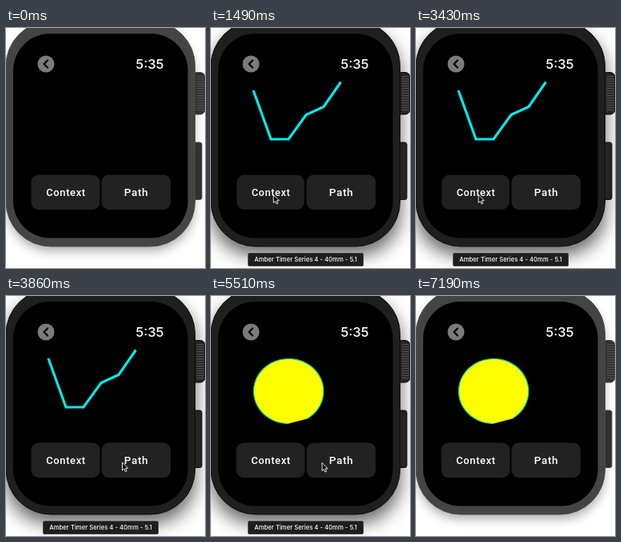
Write an HTML page that moves like this. It is 249 px wide and 300 px high and loops after 7470 ms.

```html
<!DOCTYPE html>
<html lang="en">
<head>
<meta charset="utf-8">
<title>Watch drawing demo</title>
<style>
  html, body { margin: 0; width: 100%; height: 100%; overflow: hidden; background: #fff; }
  svg { display: block; width: 249px; height: 300px; }
  text { fill: #fff; font-family: Roboto, sans-serif; font-weight: 500; }
  .mid { text-anchor: middle; }
  .ui { font-family: Inter, sans-serif; }
</style>
</head>
<body>
<svg viewBox="0 0 249 300">
  <defs>
    <filter id="soft" x="-30%" y="-30%" width="160%" height="160%"><feGaussianBlur stdDeviation="7"/></filter>
    <filter id="wide" x="-40%" y="-40%" width="180%" height="180%"><feGaussianBlur stdDeviation="11"/></filter>
    <pattern id="ridges" width="12" height="3" patternUnits="userSpaceOnUse">
      <rect width="12" height="1.2" fill="#525252"/>
    </pattern>
  </defs>
  <rect width="249" height="300" fill="#fff"/>
  <rect id="dimShade" x="2" y="2" width="233" height="276" rx="54" opacity=".36" filter="url(#soft)"/>
  <rect id="litShade" x="0" y="4" width="237" height="280" rx="54" opacity=".6" filter="url(#wide)"/>

  <g id="side" stroke-width="1">
    <rect x="231.5" y="55.5" width="17.500" height="52.500" rx="6"/>
    <rect x="233" y="143" width="12" height="71.500" rx="2.500"/>
  </g>
  <rect x="238.500" y="59" width="9.500" height="46" rx="4" fill="url(#ridges)"/>
  <rect id="body" x="0" y="-8.500" width="236.500" height="281.500" rx="56"/>
  <rect x="9" y="7" width="218.500" height="255.500" rx="46"/>

  <circle cx="50" cy="45" r="10.500" fill="#7b7b7b"/>
  <path d="M52 40.500L47.500 45L52 49.500" fill="none" stroke="#000" stroke-width="2.300" stroke-linecap="round" stroke-linejoin="round"/>
  <text class="ui" x="197.500" y="50.800" text-anchor="end" font-size="16.500">5:35</text>

  <path id="line" d="M53 78L75 139H97L119 108.500L141 98.500L162.500 67.500" fill="none" stroke="#00ecec" stroke-width="3.200"/>
  <path id="disc" d="M97 159.500A43.700 40.500 0 1 1 120 153.500" fill="#ff0" stroke="#00dcc0" stroke-width="1.200"/>

  <g id="context">
    <rect x="31.500" y="183.500" width="86" height="43.500" rx="9" fill="#222"/>
    <text class="mid" x="75" y="210" font-size="13" letter-spacing=".6">Context</text>
  </g>
  <g id="path">
    <rect x="119.500" y="183.500" width="86.500" height="43.500" rx="9" fill="#222"/>
    <text class="mid" x="163" y="210" font-size="13.500" letter-spacing=".7">Path</text>
  </g>

  <g id="label">
    <rect x="46.500" y="281.500" width="144" height="16" rx="1.500" fill="#1e1e1e" stroke="#484848"/>
    <text class="mid ui" x="118.500" y="292.300" font-size="7.700">Amber Timer Series 4 - 40mm - 5.1</text>
  </g>
  <path id="cursor" d="M0 0V10L2.300 7.900L3.900 11.500L5.500 10.800L4 7.300H7.100Z" fill="#000" stroke="#fff" stroke-width=".9" stroke-linejoin="round"/>
</svg>
<script>
const LOOP = 7470;
const el = id => document.getElementById(id);
const show = (id, on) => el(id).setAttribute('visibility', on ? 'visible' : 'hidden');
const within = (t, a, b) => t >= a && t < b;

// pointer stops: time, x, y
const stops = [
  [450, 67, 281], [600, 70, 238.5], [750, 75.5, 223], [900, 76.8, 211], [1040, 78.2, 208.5],
  [3720, 137, 208], [3860, 145.5, 208], [5360, 140, 209], [5510, 139, 208.5],
  [5650, 205, 243], [5800, 220.5, 264], [6100, 222.5, 267], [6250, 227.5, 278], [6400, 232.5, 291.5]
];

function press(id, cx, on) {
  el(id).setAttribute('transform', on
    ? `translate(${cx} 205.25) scale(.983) translate(${-cx} -205.25)` : '');
  el(id).firstElementChild.setAttribute('fill', on ? '#202020' : '#222');
}

function paint(id, fill, stroke) {
  el(id).setAttribute('fill', fill);
  el(id).setAttribute('stroke', stroke);
}

function draw(t) {
  const lit = within(t, 1490, 7190);
  show('litShade', lit);
  show('dimShade', !lit);
  paint('body', lit ? '#1f1f1f' : '#444', lit ? '#0c0c0c' : '#484848');
  paint('side', lit ? '#242424' : '#303030', lit ? '#0c0c0c' : '#484848');

  show('line', within(t, 1490, 4310));
  show('disc', t >= 4310);
  show('label', within(t, 600, 7190));
  press('context', 74.5, within(t, 1490, 1630) || within(t, 3430, 3570));
  press('path', 162.75, within(t, 4310, 4460));

  const stop = stops.filter(s => s[0] <= t).pop();
  show('cursor', stop && t < 6550);
  if (stop) el('cursor').setAttribute('transform', `translate(${stop[1]} ${stop[2]})`);
}

const start = performance.now();
function tick() {
  draw((performance.now() - start) % LOOP);
  requestAnimationFrame(tick);
}
tick();
</script>
</body>
</html>
```
